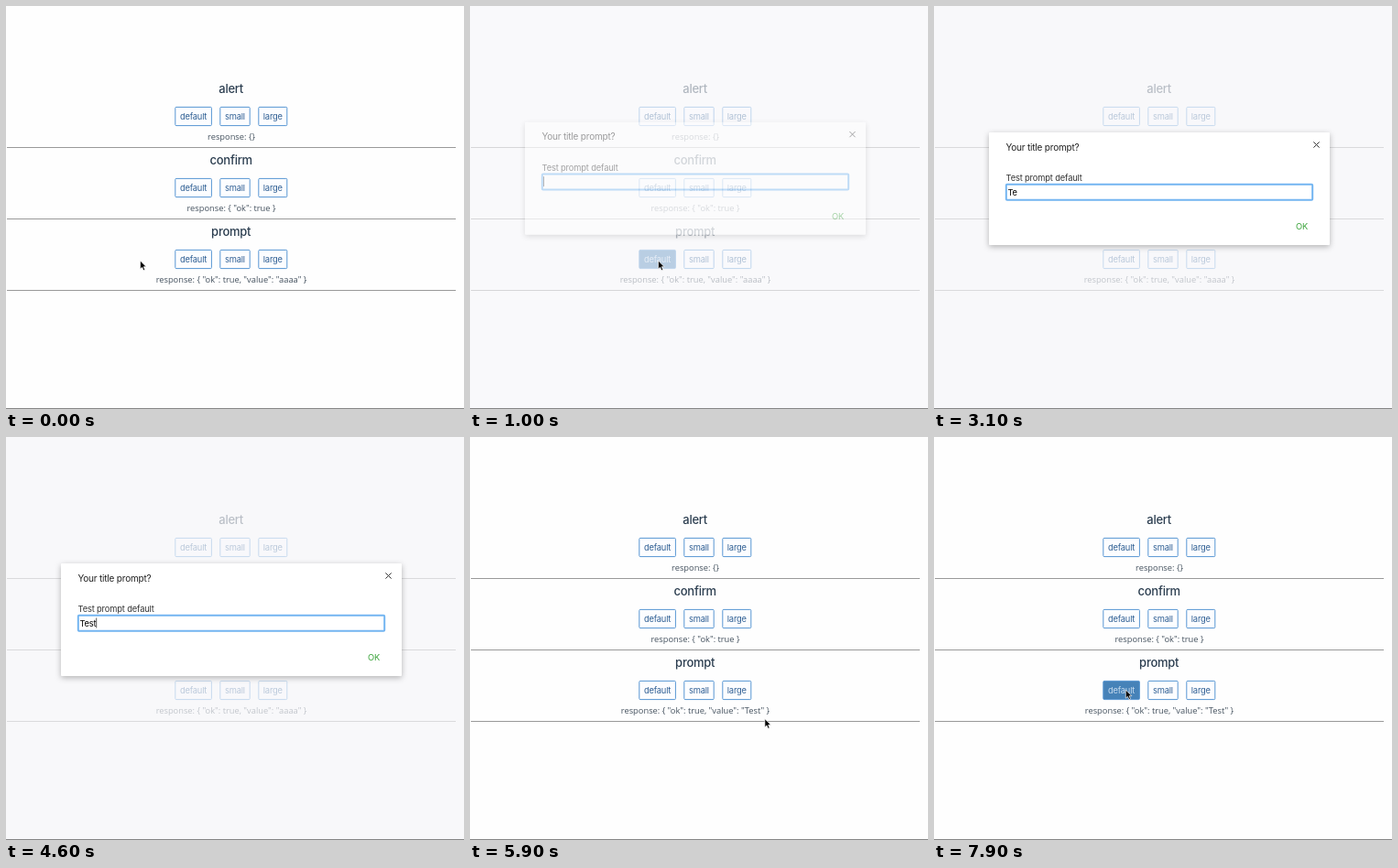
Animation of 500x440 px, one loop 8000 ms. Source, as an HTML page:

```html
<!DOCTYPE html>
<html lang="en">
<head>
<meta charset="utf-8">
<title>Dialog demo</title>
<style>
  html, body { margin: 0; width: 100%; height: 100%; overflow: hidden; background: #fefefe; }
  svg { display: block; width: 500px; height: 440px; }
  text { font: 9.3px Inter, Roboto, sans-serif; letter-spacing: -.18px; fill: #333; white-space: pre; }
  .mid { text-anchor: middle; }
  .head { font-size: 13px; font-weight: 500; letter-spacing: -.25px; fill: #2c3e50; }
  .resp { font-family: "Open Sans", "Noto Sans", sans-serif; letter-spacing: 0; fill: #45525f; }
  .btn { fill: #fcfdff; stroke: #5796d3; }
  .label { fill: #2f5f94; }
  .line { stroke: #999; }
  .box { fill: #fff; filter: drop-shadow(0 2px 3px rgba(0, 0, 0, .28)); }
</style>
</head>
<body>
<svg viewBox="0 0 500 440">
  <g id="page"></g>
  <rect id="veil" width="500" height="439" fill="#f7f7fa"/>
  <path d="M0 439.5H500" stroke="#858585"/>
  <g id="dialog">
    <rect class="box" x="60" y="138" width="372" height="123" rx="1"/>
    <text x="78.5" y="157.5" style="font-size:10px;letter-spacing:-.2px;fill:#222">Your title prompt?</text>
    <path d="M414.4 148.4l6.2 6.2m0-6.2l-6.2 6.2" stroke="#333"/>
    <text x="78.5" y="191" style="letter-spacing:-.14px">Test prompt default</text>
    <rect x="78.8" y="194.8" width="334.4" height="17" rx="1" fill="#fff" stroke="#73b5f1" stroke-width="2"/>
    <text id="typed" x="80.5" y="206.8" style="fill:#000"></text>
    <path id="caret" d="M0 197.5V208.5" stroke="#333" stroke-width=".8"/>
    <text x="395" y="244.3" style="letter-spacing:-.1px;fill:#39a339">OK</text>
  </g>
  <g id="cursor">
    <path id="arrow" d="M0 0V9.2L2.1 7.3L3.6 10.7L5.2 10L3.8 6.7H6.6Z" fill="#000" stroke="#fff" stroke-width=".7"/>
    <path id="hand" d="M-.9 6.5V.6Q0 -.7 1 .6V4Q2 3.2 2.8 4.2Q3.8 3.6 4.5 4.7Q5.6 4.3 6 5.4V8L5 11H0L-3 7Q-2.9 5.2 -.9 6.5Z" fill="#fff" stroke="#111" stroke-width=".9"/>
  </g>
</svg>
<script>
const $ = id => document.getElementById(id);
const LOOP = 8000;
const KEYS = [2300, 2500, 3300, 3600];
const CARET_X = [80.5, 86, 91, 95.5, 98.7];
const HOVERS = [[410, 760], [6300, 6900], [7030, 7760]];
const MOVES = [[50, 146.5, 278], [600, 205.5, 278], [1150, 205.5, 278], [1700, 221.3, 236], [2000, 258, 243],
  [5650, 349, 331], [5700, 349, 331], [5900, 322, 307.7], [6500, 237.5, 276], [6850, 237.5, 276], [7250, 209.3, 276]];

const buttons = [["default", 184.8, 39.6], ["small", 233.8, 32.4], ["large", 275.8, 31]];
const row = (name, response, i) => {
  const part = ([label, x, w]) => `<rect class="btn" x="${x}" y="110.4" width="${w}" height="20.2" rx="1"/>
    <text class="mid label" x="${x + w / 2}" y="124">${label}</text>`;
  return `<g transform="translate(0 ${i * 78})"><text class="mid head" x="245.7" y="95.3">${name}</text>
    ${buttons.map(part).join("")}
    <text class="mid resp" x="246" y="146">${response}</text><path class="line" d="M1 154.5H491"/></g>`;
};
$("page").innerHTML = [["alert", "{}"], ["confirm", '{ "ok": true }'], ["prompt", ""]]
  .map(([name, value], i) => row(name, "response: " + value, i)).join("");

const promptRow = $("page").lastElementChild;
const rects = promptRow.querySelectorAll(".btn");
const labels = promptRow.querySelectorAll(".label");
const response = promptRow.querySelector(".resp");

const ramp = (t, a, b) => Math.min(1, Math.max(0, (t - a) / (b - a)));
const pulse = (t, a, b, c, d) => ramp(t, a, b) - ramp(t, c, d);
const mix = (a, b, k) => `color-mix(in srgb, ${b} ${k * 100}%, ${a})`;

function paint(i, hover, press) {
  rects[i].style.fill = mix(mix("#fcfdff", "#aeccea", hover), "#4682b8", press);
  labels[i].style.fill = mix("#2f5f94", "#c6daee", press);
}

function position(t) {
  const i = MOVES.findIndex(m => m[0] > t);
  if (i < 0) return MOVES.at(-1).slice(1);
  const b = MOVES[i], a = MOVES[Math.max(0, i - 1)], k = ramp(t, a[0], b[0]);
  return [a[1] + (b[1] - a[1]) * k, a[2] + (b[2] - a[2]) * k];
}

function draw(t) {
  response.textContent = `response: { "ok": true, "value": "${t < 4690 ? "aaaa" : "Test"}" }`;
  paint(0, pulse(t, 410, 600, 1050, 1300) + ramp(t, 7030, 7230),
    pulse(t, 740, 850, 1050, 1350) + ramp(t, 7740, 7880));
  paint(1, pulse(t, 6300, 6500, 6900, 7100), 0);

  $("veil").style.opacity = .7 * pulse(t, 750, 1020, 4700, 5000);
  const shown = pulse(t, 850, 1200, 4650, 4950);
  $("dialog").style.opacity = shown;
  $("dialog").setAttribute("transform", `translate(0 ${-20 * (1 - shown)})`);

  const count = KEYS.filter(k => k <= t).length;
  const since = t - (count ? KEYS[count - 1] : 1000);
  $("typed").textContent = "Test".slice(0, count);
  $("caret").setAttribute("transform", `translate(${CARET_X[count]})`);
  $("caret").style.opacity = since % 1000 < 500 ? 1 : 0;

  const hand = HOVERS.some(([a, b]) => t >= a && t < b);
  $("hand").style.opacity = hand ? 1 : 0;
  $("arrow").style.opacity = hand ? 0 : 1;
  $("cursor").style.opacity = t > 2050 && t < 5650 ? 0 : 1;
  $("cursor").setAttribute("transform", `translate(${position(t)})`);
}

const start = performance.now();
function tick() {
  draw((performance.now() - start) % LOOP);
  requestAnimationFrame(tick);
}
tick();
</script>
</body>
</html>
```
